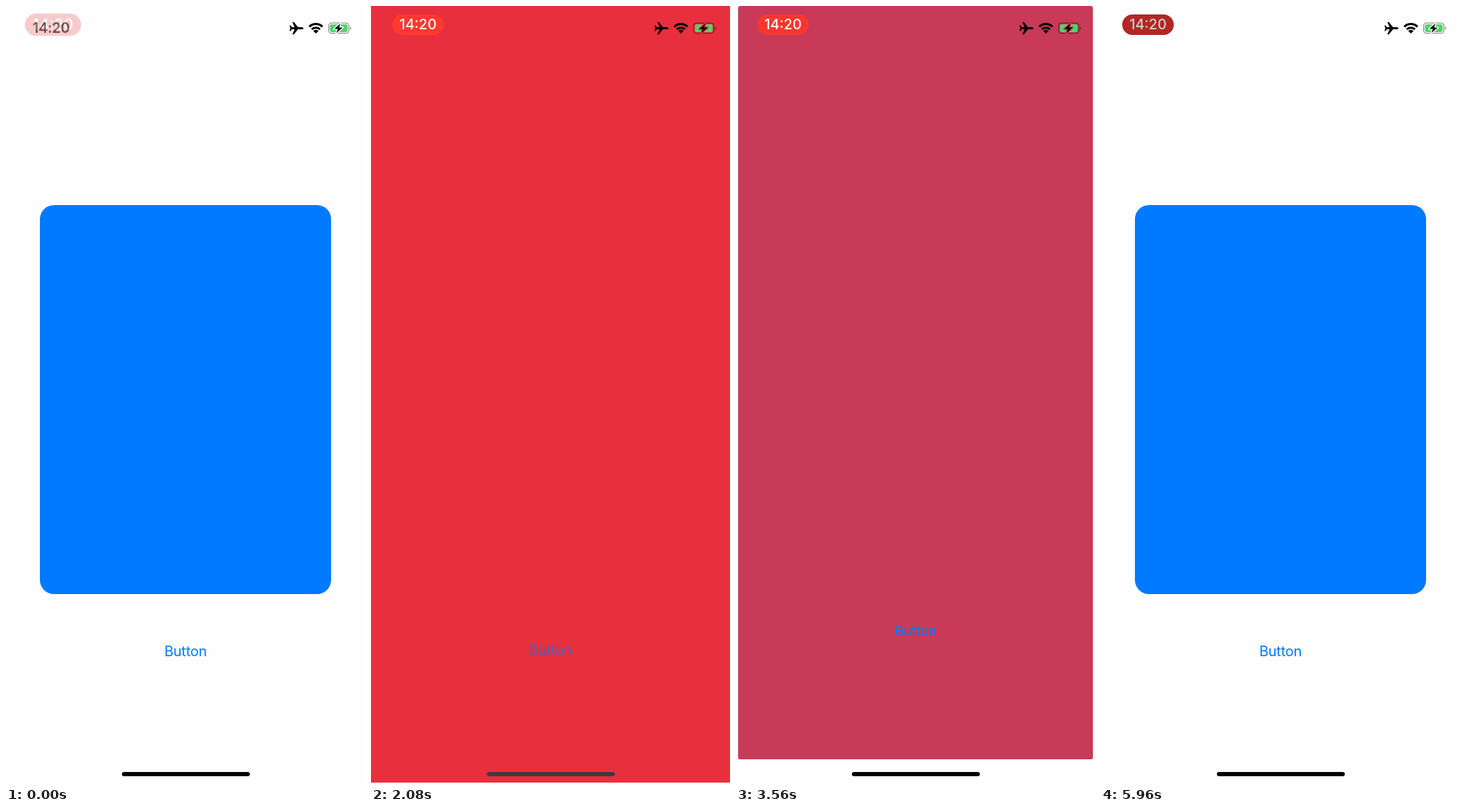
Animation, 508 px wide and 1102 px high, one loop 6000 ms. Source, as an HTML page:

```html
<!DOCTYPE html>
<html lang="en">
<head>
<meta charset="utf-8">
<title>Expanding card</title>
<style>
  html, body { margin: 0; width: 100%; height: 100%; overflow: hidden; background: #fefdff; }
  #stage { position: relative; width: 508px; height: 1102px; overflow: hidden; font-family: Inter, Roboto, sans-serif; }
  #stage * { animation-duration: 6s; animation-iteration-count: infinite; animation-timing-function: ease-in-out; }
  #card, .button, #home, #icons, #clock, #pill { position: absolute; }

  .button {
    left: 0; width: 508px; height: 30px; margin-top: -15px;
    font-size: 20px; line-height: 30px; letter-spacing: -.25px;
    text-align: center; color: #007aff;
  }
  #open { top: 914px; animation-name: press-open; animation-timing-function: linear; }
  #close {
    top: 82.9%; left: 50%; margin-left: -254px;
    animation-name: press-close; animation-timing-function: linear;
  }

  #card {
    left: 48px; top: 282px; width: 412px; height: 551px;
    border-radius: 20px; background: #007aff; overflow: hidden;
    animation-name: grow, rise, tint;
  }

  #home {
    left: 163.5px; top: 1084.5px; width: 181.5px; height: 6.5px;
    border-radius: 4px; background: #000; animation-name: home;
  }
  #icons { left: 0; top: 0; }

  #clock, #pill { font-size: 20px; text-align: center; }
  #clock {
    left: 24px; top: 16px; width: 80px; line-height: 30px;
    font-weight: 600; letter-spacing: -.3px; opacity: 0; animation-name: clock;
  }
  #pill {
    left: 30px; top: 12px; width: 73px; height: 29px; line-height: 29px;
    border-radius: 14.5px; font-weight: 500; color: #fff; background: #dc302c;
    animation-name: appear, pill-tint, dim;
  }

  /* Card: the top edge leads while opening and lags while closing */
  @keyframes grow {
    0%, 16.867%, 42.667%, 53.45%, 79.25%, 100% { left: 48px; width: 412px; height: 551px; }
    24.033%, 34.333%, 60.617%, 70.917% { left: 0; width: 508px; height: 1102px; }
  }
  @keyframes rise {
    0%, 16.867%, 42.667%, 53.45%, 79.25%, 100% { top: 282px; }
    22.033%, 37.5%, 58.617%, 74.083% { top: 0; }
  }
  @keyframes tint {
    0%, 19.2%, 41%, 55.783%, 77.583%, 100% { background: #007aff; border-radius: 20px; }
    24.033%, 34.333%, 60.617%, 70.917% { background: #e92f3c; border-radius: 0; }
  }
  @keyframes pill-tint {
    0%, 19.2%, 42.667%, 55.783%, 79.25%, 100% { background: #dc302c; }
    24.033%, 35.5%, 60.617%, 72.083% { background: #ff3830; }
  }

  /* Buttons dim on touch, then fade back */
  @keyframes press-open {
    0%, 14.367%, 22.533%, 50.95%, 59.117%, 100% { opacity: 1; }
    14.4%, 15.2%, 50.983%, 51.783% { opacity: .2; }
  }
  @keyframes press-close {
    0%, 31.333%, 36.5%, 67.917%, 73.083%, 100% { opacity: 1; }
    31.367%, 32.167%, 67.95%, 68.75% { opacity: .2; }
  }

  @keyframes home {
    0%, 24%, 35.4%, 60.6%, 71.98%, 100% { background: #000; }
    26%, 34.68%, 62.6%, 71.27% { background: #3b3a44; }
  }

  /* Recording pill replaces the clock, and darkens when tapped */
  @keyframes clock {
    0% { opacity: .68; }
    4%, 100% { opacity: 0; }
  }
  @keyframes appear {
    0% { opacity: .24; transform: scale(1.09); }
    6%, 100% { opacity: 1; transform: none; }
  }
  @keyframes dim {
    0%, 97.3% { filter: brightness(1); }
    99.2%, 100% { filter: brightness(.81); }
  }
</style>
</head>
<body>
<div id="stage">
  <div id="open" class="button">Button</div>
  <div id="card"><div id="close" class="button">Button</div></div>
  <div id="home"></div>

  <svg id="icons" width="508" height="60" viewBox="0 0 508 60">
    <defs>
      <path id="bolt" d="M473.2 24.8 L464.6 32.6 H469.6 L467.6 38.2 L476.4 30.4 H471.2 Z"/>
      <mask id="gap" maskUnits="userSpaceOnUse" x="450" y="18" width="45" height="28">
        <rect x="450" y="18" width="45" height="28" fill="#fff"/>
        <use href="#bolt" stroke="#000" stroke-width="3" stroke-linejoin="round"/>
      </mask>
    </defs>
    <!-- airplane -->
    <path d="M421 31.5 C421 30.4 419.4 29.9 417.6 29.9 H413.2 L407.4 22.8 H405.2 L408.3 29.9 H404.5 L402.6 27.4 H401.2 L402.3 31.5 L401.2 35.6 H402.6 L404.5 33.1 H408.3 L405.2 40.2 H407.4 L413.2 33.1 H417.6 C419.4 33.1 421 32.6 421 31.5 Z"/>
    <!-- wifi -->
    <g fill="none" stroke="#000" stroke-width="3">
      <path d="M429.2 29.4 A13.3 13.3 0 0 1 447.8 29.4"/>
      <path d="M432.7 33 A8.3 8.3 0 0 1 444.3 33"/>
    </g>
    <path d="M438.5 39 L434.7 35.2 A5.4 5.4 0 0 1 442.3 35.2 Z"/>
    <!-- battery -->
    <g mask="url(#gap)">
      <rect x="456.6" y="24.1" width="28.6" height="14.6" rx="4" fill="none" stroke="#000" stroke-opacity=".42" stroke-width="1.3"/>
      <rect x="458.4" y="25.9" width="25" height="11" rx="2.4" fill="#4cd66a"/>
    </g>
    <path d="M486.9 29 A2.6 2.6 0 0 1 486.9 33.8 Z" fill-opacity=".42"/>
    <use href="#bolt"/>
  </svg>

  <div id="clock">14:20</div>
  <div id="pill">14:20</div>
</div>
</body>
</html>
```
